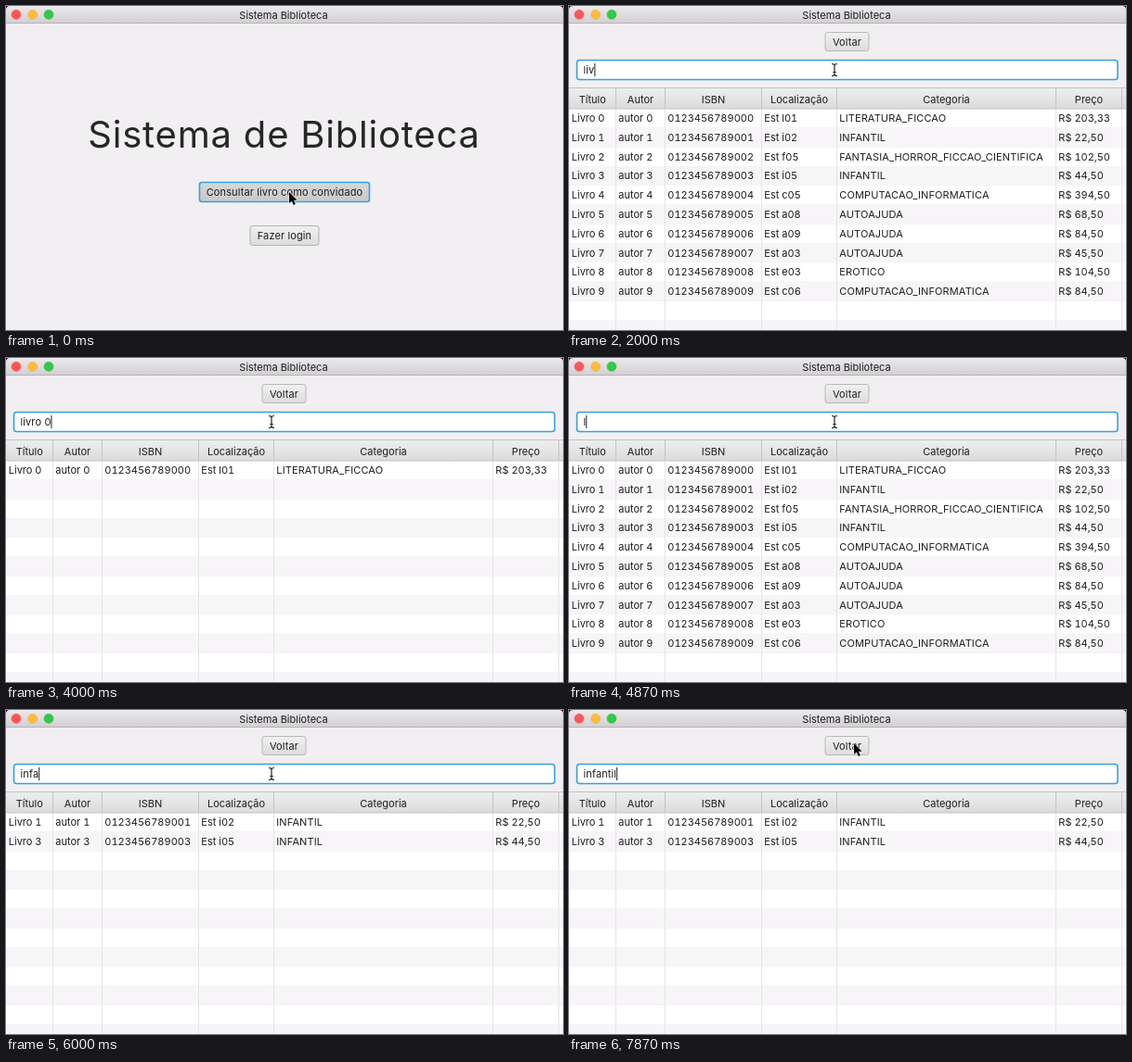
An HTML page for the animation above (8000 ms loop, 600 by 350 pixels).

```html
<!DOCTYPE html>
<html lang="pt">
<head>
<meta charset="utf-8">
<title>Sistema Biblioteca</title>
<style>
html, body { margin: 0; width: 600px; height: 350px; overflow: hidden; background: #f1eff1; }
svg { display: block; }
text { font: 11px Inter, sans-serif; fill: #1e1e1e; white-space: pre; }
.num { font-feature-settings: "tnum"; }
.wide { letter-spacing: .12px; }
.title { font-size: 40px; letter-spacing: .8px; fill: #262626; }
.hint { fill: #9b9a9b; }
</style>
</head>
<body>
<svg id="stage" width="600" height="350" viewBox="0 0 600 350">
  <defs>
    <linearGradient id="bar" x2="0" y2="1"><stop stop-color="#ebe9eb"/><stop offset="1" stop-color="#d2d0d2"/></linearGradient>
    <linearGradient id="face" x2="0" y2="1"><stop stop-color="#f1f1f1"/><stop offset="1" stop-color="#dcdcdc"/></linearGradient>
    <linearGradient id="down" x2="0" y2="1"><stop stop-color="#d8d8d8"/><stop offset="1" stop-color="#c8c8c8"/></linearGradient>
    <linearGradient id="head" x2="0" y2="1"><stop stop-color="#f0eff0"/><stop offset="1" stop-color="#dcdbdc"/></linearGradient>
  </defs>
</svg>
<script>
const LOOP = 8000;
const stage = document.getElementById('stage');

function add(parent, tag, attrs, text) {
  const el = document.createElementNS('http://www.w3.org/2000/svg', tag);
  for (const k in attrs) el.setAttribute(k, attrs[k]);
  if (text !== undefined) el.textContent = text;
  parent.appendChild(el);
  return el;
}
const rect = (p, x, y, width, height, fill, more) => add(p, 'rect', { x, y, width, height, fill, ...more });
const label = (p, x, y, text, more) => add(p, 'text', { x, y, ...more }, text);
const centred = { 'text-anchor': 'middle' };
const show = (el, on) => el.setAttribute('visibility', on ? 'visible' : 'hidden');

function button(p, x, y, w, h, text) {
  const box = rect(p, x + .5, y + .5, w - 1, h - 1, 'url(#face)', { rx: 2.5, stroke: '#b3b2b3' });
  label(p, x + w / 2, y + h / 2 + 4, text, { ...centred, class: 'wide' });
  return box;
}
function setFocus(box, on) {
  box.setAttribute('stroke', on ? '#35a3d6' : '#b9b8b9');
  box.setAttribute('stroke-width', on ? 1.6 : 1);
}

// Welcome page
const home = add(stage, 'g', {});
rect(home, 0, 18, 600, 332, '#f1eff1');
label(home, 299.5, 152.7, 'Sistema de Biblioteca', { ...centred, class: 'title' });
const guest = button(home, 208, 190, 184, 22, 'Consultar livro como convidado');
setFocus(guest, true);
button(home, 262.5, 237, 75, 22, 'Fazer login');

// Search page
const search = add(stage, 'g', {});
rect(search, 0, 18, 600, 332, '#f1eff1');
const back = button(search, 275.5, 28, 48, 21, 'Voltar');
const field = rect(search, 8.5, 58.5, 582.5, 21, '#fff', { rx: 3 });
const prompt = label(search, 15.5, 73, 'Pesquisar por título, autor, ISBN, localização, categoria ou preço', { class: 'wide hint' });
const input = label(search, 15.5, 73, '', { class: 'wide' });
const caret = rect(search, 0, 62, 1, 14, '#222');

const TOP = 111, PITCH = 20.8;
const edges = [0, 50.5, 103.5, 207.5, 288.5, 524.5, 595.5];
const heads = ['Título', 'Autor', 'ISBN', 'Localização', 'Categoria', 'Preço'];
for (let i = 0; i < 12; i++) {
  rect(search, 0, TOP + i * PITCH, 600, PITCH, i % 2 ? '#f7f5f7' : '#fff');
  rect(search, 0, TOP + (i + 1) * PITCH - .5, 600, .6, '#f0eef0');
}
rect(search, 0, 88, 600, 23, 'url(#head)');
rect(search, 0, 88, 600, 1, '#c3c2c3');
rect(search, 0, 110.5, 600, 1, '#c3c2c3');
edges.slice(1).forEach((x, i) => {
  rect(search, x - .5, 89, 1, 22, '#c3c2c3');
  rect(search, x - .5, 111.5, 1, 239, '#e6e5e6');
  label(search, (edges[i] + x) / 2, 104.7, heads[i], centred);
});

const shelves = 'l01 i02 f05 i05 c05 a08 a09 a03 e03 c06'.split(' ');
const prices = '203,33 22,50 102,50 44,50 394,50 68,50 84,50 45,50 104,50 84,50'.split(' ');
const kinds = {
  l: 'LITERATURA_FICCAO', i: 'INFANTIL', f: 'FANTASIA_HORROR_FICCAO_CIENTIFICA',
  c: 'COMPUTACAO_INFORMATICA', a: 'AUTOAJUDA', e: 'EROTICO'
};
const books = shelves.map((shelf, i) => {
  const kind = kinds[shelf[0]];
  const cells = ['Livro ' + i, 'autor ' + i, '012345678900' + i, 'Est ' + shelf, kind, 'R$ ' + prices[i]];
  const row = add(search, 'g', {});
  cells.forEach((c, k) => label(row, edges[k] + 2.8, TOP + 14, c, { class: c === kind ? 'wide' : 'num' }));
  return { row, key: cells.join('\n').toLowerCase() };
});

// Title bar
rect(stage, 0, 0, 600, 18, 'url(#bar)');
rect(stage, 0, 18, 600, 1, '#b5b3b5');
add(stage, 'path', { d: 'M0 0H4Q0 0 0 4ZM600 0H596Q600 0 600 4Z', fill: '#111' });
[[11, '#fc5753', '#ee514d'], [28.7, '#fdbc40', '#eeaf3a'], [46, '#34c748', '#2fb940']].forEach(
  ([cx, fill, stroke]) => add(stage, 'circle', { cx, cy: 9.3, r: 5, fill, stroke, 'stroke-width': .6 }));
label(stage, 299, 13.5, 'Sistema Biblioteca', centred);

// Pointers, both with their hot spot at 0,0
const arrow = add(stage, 'path', {
  d: 'M0 0V12L2.8 9.5L4.7 14L6.8 13.1L4.9 8.8H8.6Z',
  fill: '#000', stroke: '#fff', 'stroke-width': 1, 'paint-order': 'stroke'
});
const beam = add(stage, 'g', { fill: 'none' });
[['#fff', 2.6], ['#222', 1.2]].forEach(([stroke, w]) => add(beam, 'path', {
  d: 'M-3 -6.5Q0 -6.5 0 -4.5Q0 -6.5 3 -6.5M0 -5V5M-3 6.5Q0 6.5 0 4.5Q0 6.5 3 6.5M-1.7 2.5H1.7', stroke, 'stroke-width': w
}));

const OPEN = 200, FOCUS = 1670;
const typing = [
  [FOCUS, ''], [1800, 'l'], [1870, 'li'], [1930, 'liv'], [2130, 'livr'], [2330, 'livro'], [2470, 'livro '], [2730, 'livro 0'],
  [4070, 'livro '], [4530, 'livro'], [4620, 'livr'], [4700, 'liv'], [4790, 'li'], [4865, 'l'], [4930, ''],
  [5530, 'i'], [5665, 'in'], [5865, 'inf'], [5990, 'infa'], [6330, 'infan'], [6395, 'infant'], [6530, 'infanti'], [6665, 'infantil']
];
const hidden = [[3130, 3665], [7130, 7600]];
const path = [
  [0, 305, 201], [270, 305, 201], [400, 304, 181], [600, 298, 121], [750, 290, 83], [900, 286, 69],
  [7320, 286, 69], [7470, 302, 59], [7600, 316, 48], [7730, 313, 39], [7860, 307, 36], [LOOP, 307, 36]
];

function pointer(t) {
  let i = 1;
  while (i < path.length - 1 && path[i][0] < t) i++;
  const [t0, x0, y0] = path[i - 1], [t1, x1, y1] = path[i];
  const k = (t - t0) / (t1 - t0);
  return [x0 + (x1 - x0) * k, y0 + (y1 - y0) * k];
}

let shown = null;
function setQuery(q) {
  if (q === shown) return;
  shown = q;
  input.textContent = q;
  let n = 0;
  for (const { row, key } of books) {
    const hit = key.includes(q);
    row.setAttribute('display', hit ? 'inline' : 'none');
    if (hit) row.setAttribute('transform', `translate(0 ${PITCH * n++})`);
  }
}

function draw(t) {
  const open = t >= OPEN, focus = t >= FOCUS;
  home.setAttribute('display', open ? 'none' : 'inline');
  search.setAttribute('display', open ? 'inline' : 'none');
  guest.setAttribute('fill', t < 130 ? 'url(#down)' : 'url(#face)');

  setFocus(back, !focus);
  setFocus(field, focus);
  show(prompt, !focus);
  const step = typing.filter(s => s[0] <= t).pop();
  setQuery(step ? step[1] : '');
  const blink = hidden.some(([a, b]) => t >= a && t < b);
  show(caret, open && focus && !blink);
  if (open) caret.setAttribute('x', 15.5 + (shown ? input.getComputedTextLength() : 0));

  const [x, y] = pointer(t);
  const inField = open && y > 58 && y < 80;
  show(arrow, !inField);
  show(beam, inField);
  (inField ? beam : arrow).setAttribute('transform', `translate(${x} ${y})`);
}

const start = performance.now();
function tick() {
  draw((performance.now() - start) % LOOP);
  requestAnimationFrame(tick);
}
tick();
</script>
</body>
</html>
```
